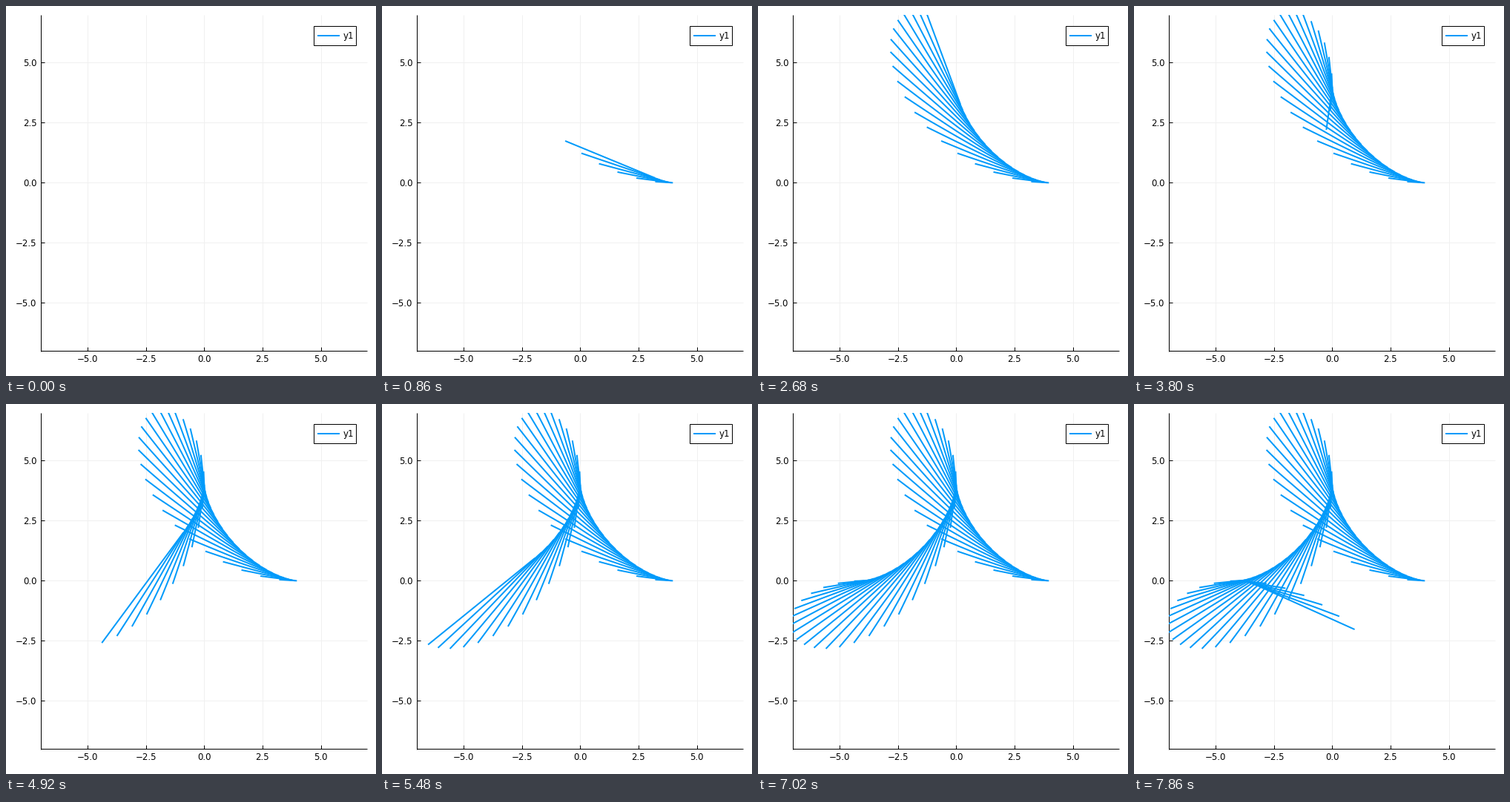
These frames come from a looping animation (499 px wide and 499 px high, 8 s). A matplotlib script:

```python
import numpy as np
import matplotlib.pyplot as plt
from matplotlib.animation import FuncAnimation
from matplotlib.collections import LineCollection
from matplotlib.patches import Rectangle

SIZE, DPI = 499, 64
PT = 72 / DPI  # points per pixel
LEFT, RIGHT, TOP, BOTTOM = 47.2, 487.4, 11.7, 465.2
LIM = 7
BLUE, GRID = "#009afa", "#f0f0f0"
STEP_MS, FIRST_MS, LOOP_MS, TICK_MS = 140, 20, 8000, 20

plt.rcParams["font.family"] = "DejaVu Sans"
fig = plt.figure(figsize=(SIZE / DPI, SIZE / DPI), dpi=DPI, facecolor="white")


def layer(rect, xlim, ylim):
    ax = fig.add_axes(rect)
    ax.set_axis_off()
    ax.set_xlim(*xlim)
    ax.set_ylim(*ylim)
    return ax


back = layer([0, 0, 1, 1], (0, SIZE), (SIZE, 0))
plot = layer([LEFT / SIZE, 1 - BOTTOM / SIZE, (RIGHT - LEFT) / SIZE, (BOTTOM - TOP) / SIZE],
             (-LIM, LIM), (-LIM, LIM))
front = layer([0, 0, 1, 1], (0, SIZE), (SIZE, 0))


def line(ax, x0, y0, x1, y1, color="black", width=1.0, z=2):
    ax.plot([x0, x1], [y0, y1], color=color, lw=width * PT,
            solid_capstyle="butt", zorder=z)


def label(ax, x, y, s, ha):
    ax.text(x, y, s, ha=ha, va="baseline", fontsize=11.7 * PT, color="black")


# Grid, ticks and tick labels
for v in np.arange(-5, 5.1, 2.5):
    px = LEFT + (v + LIM) / (2 * LIM) * (RIGHT - LEFT)
    py = BOTTOM - (v + LIM) / (2 * LIM) * (BOTTOM - TOP)
    text = f"{v:.1f}".replace("-", "\u2212")
    line(back, px, TOP, px, BOTTOM, GRID, z=1)
    line(back, LEFT, py, RIGHT, py, GRID, z=1)
    line(back, px, BOTTOM, px, BOTTOM - 5)
    line(back, LEFT, py, LEFT + 5, py)
    label(back, px, 480.5, text, "center")
    label(back, 41.3, py + 4.4, text, "right")

line(back, LEFT, TOP, LEFT, BOTTOM + 0.5)
line(back, LEFT - 0.5, BOTTOM, RIGHT, BOTTOM)

# Legend
front.add_patch(Rectangle((415.5, 26.5), 57, 26, fc="white", ec="black", lw=PT))
line(front, 420, 40, 450.5, 40, BLUE, 2)
label(front, 454.5, 44.4, "y1", "left")

# Velocity vectors along the astroid (4cos^3 t, 4sin^3 t)
t = np.linspace(0, 2 * np.pi, 100)
c, s = np.cos(t), np.sin(t)
point = np.column_stack([4 * c**3, 4 * s**3])
speed = np.column_stack([-12 * c**2 * s, 12 * s**2 * c])
segments = np.stack([point, point + speed], axis=1)

rays = LineCollection([], colors=BLUE, linewidths=2 * PT, capstyle="butt")
plot.add_collection(rays, autolim=False)


def update(i):
    elapsed = i * TICK_MS - FIRST_MS
    count = elapsed // STEP_MS + 1 if elapsed >= 0 else 0
    rays.set_segments(segments[1:count] if count > 1 else [])
    return [rays]


anim = FuncAnimation(fig, update, frames=LOOP_MS // TICK_MS, interval=TICK_MS,
                     repeat=True, repeat_delay=0, blit=False)
plt.show()
```
